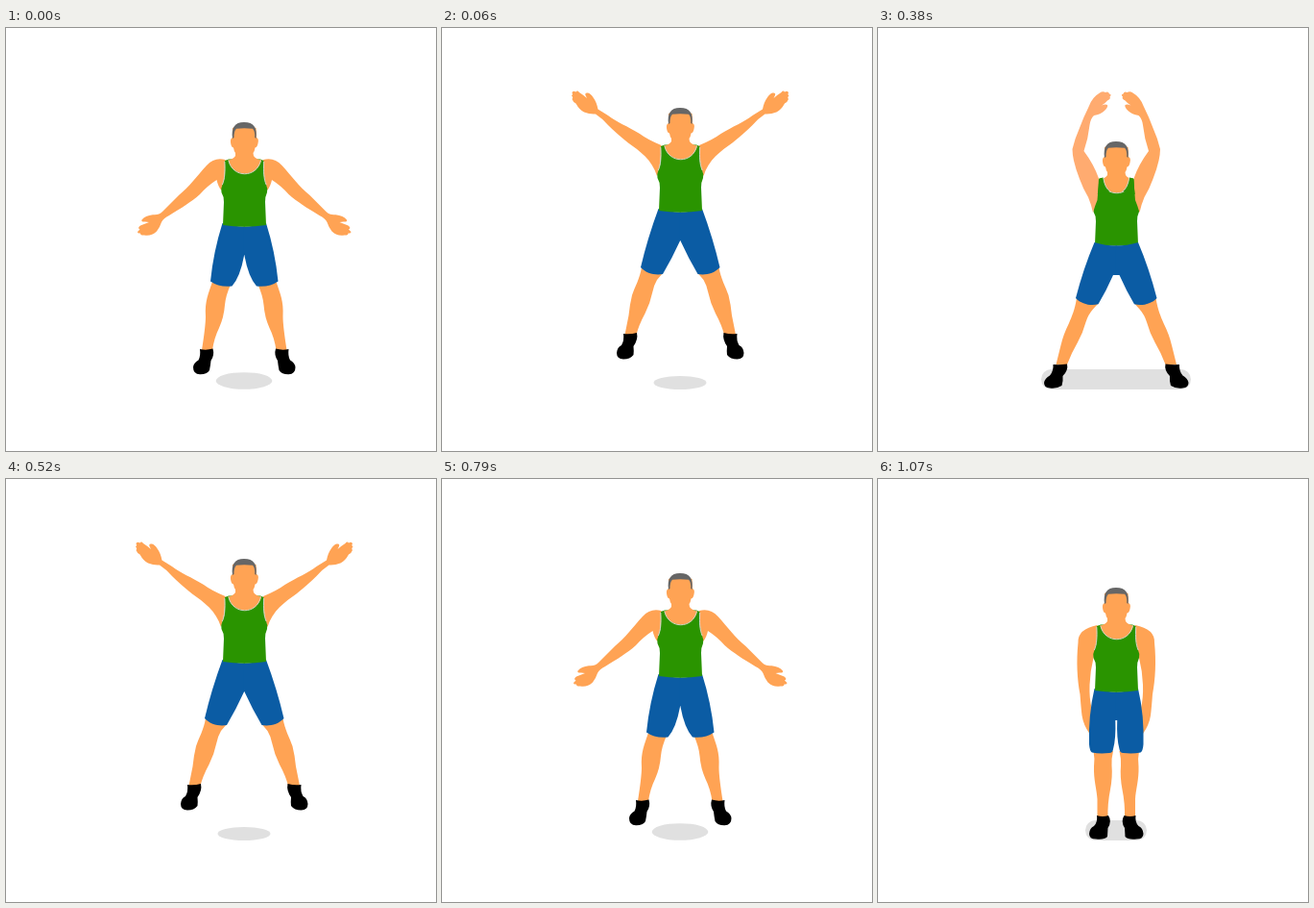
Animation of 448x440 px, one loop 1200 ms. Source, as an HTML page:

```html
<!DOCTYPE html>
<html lang="en">
<head>
<meta charset="utf-8">
<title>Jumping jack</title>
<style>
  html, body { margin: 0; width: 100%; height: 100%; overflow: hidden; background: #fff; }
  svg { display: block; width: 448px; height: 440px; }
  .skin { fill: #ffa354; }
  .arm { fill: var(--arm, #ffa354); }
  .shirt { fill: #2a9400; }
  .shorts { fill: #0b5ca4; }
  .hair { fill: #666; }
  .shadow { fill: #e0e0e0; }
  .seam { fill: none; stroke: #d2d4c4; stroke-width: 1; }
  .far { --arm: #ffab70; }
  .near { --arm: #ffa760; }
  .pose { visibility: hidden; animation: 1.2s step-end infinite; }
  #open { animation-name: open; }
  #leap { animation-name: leap; }
  #land { animation-name: land; }
  #rest { animation-name: rest; }
  @keyframes open {
    0% { visibility: visible; }
    5% { visibility: hidden; }
    55% { visibility: visible; }
    73.3333%, 100% { visibility: hidden; }
  }
  @keyframes leap {
    0% { visibility: hidden; }
    5% { visibility: visible; }
    13.3333% { visibility: hidden; }
    43.3333% { visibility: visible; }
    55%, 100% { visibility: hidden; }
  }
  @keyframes land {
    0% { visibility: hidden; }
    13.3333% { visibility: visible; }
    43.3333%, 100% { visibility: hidden; }
  }
  @keyframes rest {
    0% { visibility: hidden; }
    73.3333%, 100% { visibility: visible; }
  }
</style>
</head>
<body>
<svg viewBox="0 0 448 440">
  <defs>
    <g id="torso">
      <path class="shirt" d="M228 138 L232 136.5 L265 136.5 L268.5 138 C268 150 269 157 271 163 Q273 167 272 171 Q270 175 270 181 L271 205 Q248.3 208.5 226 205 L227 181 Q227 175 224.5 171 Q223.5 167 225.5 163 C228 157 228.5 150 228 138 Z"/>
      <path class="skin" d="M236 104 Q248 98 260.5 104 L261 114 Q263.5 115 262.7 119 Q262 124 259.5 124.5 Q259 128 257.5 130 L258 133 Q260 136 266 137.5 C262 156 236 156 231.5 137.5 Q237 136 239 133 L239 130 Q237.5 128 237 124.5 Q234.5 124 234 119 Q233.5 115 236 114 Z"/>
      <path class="seam" d="M231.8 137.5 C236 156.5 261.5 156.5 265.5 137.5 M227.8 139 C228.3 150 228 157 225.3 163 M268.7 139 C268.2 150 268.5 157 271.2 163"/>
      <path class="hair" d="M236 115 C234.5 104 238 98 248 98 C258.5 98 262 104 260.5 115 L259.2 114 Q259.5 107 257 104.8 Q248 103.8 240 104.8 Q237.5 107 237.5 114 Z"/>
    </g>

    <g id="openHalf">
      <path class="skin" d="M228.5 137 Q217 134 209 143 C199 154 191 165 180 174 L163 191 Q159 195 153 194.2 Q145 195 141.5 199.5 Q140.5 202 145 201.5 L149 202 L140 205.5 Q136.5 208 139.5 209.5 L137 212 Q137 214 140 213.5 Q140 216 144 215.5 Q151 217 157 211.5 Q160 208 162 202 Q164 198 170 195 C183 187 193 181 202 173 Q210 164 219.5 158 Q221 165 224.5 169 Q228 158 228.5 137 Z"/>
      <path class="skin" d="M215 264 C211 276 207 284 208 300 Q208 310 204 335 L215 335 Q217 322 222 312 Q227 301 228 288 Q229 278 234 267 Z"/>
      <path class="shorts" d="M225.5 203 Q237 206.5 249 206.5 L249 236 L248.2 236 Q244 259 235.5 268.5 Q222 270 213 263.5 Q216 233 225.5 203 Z"/>
      <path d="M202 334 Q209 335.5 215.5 333.5 Q217.5 340 213.5 346 Q213 351 212 356 Q209 360.5 202 360.3 Q195 360 195 353 Q195.5 348 200.5 345.5 Q203 341 202 334 Z"/>
    </g>

    <g id="leapHalf">
      <path class="skin" d="M228.5 122 Q214 116 206 110 C193 102 182 98 173 91 L162.5 84.5 Q161 77 158 73 Q155 68 152 67.5 Q148.5 67 149.5 70 L151 73 Q147 69.5 143 67 Q141 64.5 139.5 66.5 Q136 64.5 135.5 67.5 Q137 69 135 70.5 Q137 72 135.5 74 Q136.5 77 139.5 78.5 Q143 85 148 87.5 Q154 90 160 89.5 Q167 94 173 101 Q181 109 194 119.5 C206 128 219 137 224 154 Q228 143 228.5 122 Z"/>
      <path class="skin" d="M208 249 C206 261 201 269 198 278 Q195.5 288 194.5 299 L190.5 319 L202.5 319 Q205 309 211.5 297 Q217 286 219.5 274 Q221 267 224 262 L230 255 Z"/>
      <path class="shorts" d="M225.5 188 Q237 191.5 249 191.5 L249 221 L248.2 221 Q240 239 230 256 C222 257.3 213 255.5 207 249 Q214 219 225.5 188 Z"/>
      <path d="M189 318 Q196 319 203 317 Q204.5 324 199.5 331 Q200 336 199.5 340 Q196 344.5 189 344.5 Q182 344 182 338 Q182.5 332 187 330 Q190 325 189 318 Z"/>
    </g>

    <g id="landHalf">
      <path class="arm" d="M230 156.5 Q225 142 214.5 128 Q219 115 220.5 101 Q221.5 94 225 91 Q232 90 236 86 Q240 82 239 80 Q237 79 233 80.5 Q237 78 239 75.500 Q243 73.5 241.5 71.5 Q244 69 241 68.5 Q240 65.5 237 67 Q234 65.5 231 67.5 Q223 72 219.5 82 Q214 93 210 104 Q205 115 202.5 126 Q202.500 131 204 138 Q206 147 210 157 Q214 168 219 176 Q222 183 224 192 Q226 185 228.5 179 Q229.5 168 230 156.5 Z"/>
      <path class="shirt" d="M230.3 156.5 L234.6 155.5 Q236 165 241.5 170 L228.8 173 Q230 165 230.3 156.5 Z"/>
      <path class="seam" d="M234.8 156 Q236.500 167 242.500 170.500"/>
      <path class="skin" d="M207 281 C205 293 202 300 199 307 Q193 319 190.5 330 L185.500 350 L197 350 Q201.5 338 208 327 Q213.500 317 216.5 306 Q219 298 224 292.500 L229 287 Z"/>
      <path class="shorts" d="M225.5 223 Q237 226.5 249 226.5 L249 257 L245 257 Q238 273 229.5 287.3 C222 289.3 212 287.500 206 281 Q214 250 225.5 223 Z"/>
      <path d="M182.5 350 Q190 350.5 197 349.5 Q198.5 356 192.5 362 Q193 367 191.5 372 Q186 375.5 179 374.5 Q173 374 173 369 Q174 364 179 361.5 Q183 357 182.5 350 Z"/>
    </g>

    <g id="restHalf">
      <path class="skin" d="M228.5 152 Q208 156 208.5 170 C206.5 190 207.5 208 210.5 224 Q211.5 238 212.5 246 Q214 256 220.5 265 L223 262 L222.5 238 Q220 228 220.5 214 Q221 200 224.5 186 Q228.5 174 228.5 152 Z"/>
      <path class="skin" d="M224.5 283 Q226 290 225 299 C224.5 313 228 323 228.5 333 L228.5 352 L239.5 352 Q239 338 242 323 Q244.5 310 243.5 298 Q243 291 245 283 Z"/>
      <path class="shorts" d="M225.5 218 Q237 221.5 249 221.5 L249 251 L247.3 251 Q248 270 245 281 Q244.5 285 241 285 Q231 286 223 284.5 Q220.5 283 220 276 Q219 246 225.5 218 Z"/>
      <path d="M228 350 Q234 352 240 350 Q244 356 239.5 363 L239 372 Q236 375.5 227 374.5 Q220 374.5 220 369 Q220.5 363 225 361 Q229 357 228 350 Z"/>
    </g>
  </defs>

  <g id="open" class="pose">
    <ellipse class="shadow" cx="248" cy="367" rx="29.3" ry="8.8"/>
    <use href="#openHalf"/>
    <use href="#openHalf" transform="matrix(-1 0 0 1 496.5 0)"/>
    <use href="#torso"/>
  </g>
  <g id="leap" class="pose">
    <ellipse class="shadow" cx="248" cy="369" rx="27.5" ry="7"/>
    <use href="#leapHalf"/>
    <use href="#leapHalf" transform="matrix(-1 0 0 1 496.5 0)"/>
    <use href="#torso" y="-15"/>
  </g>
  <g id="land" class="pose">
    <rect class="shadow" x="170" y="355" width="156" height="21" rx="10.5"/>
    <use href="#torso" y="20"/>
    <use href="#landHalf" class="far"/>
    <use href="#landHalf" class="near" transform="matrix(-1 0 0 1 496.5 0)"/>
  </g>
  <g id="rest" class="pose">
    <rect class="shadow" x="216" y="355" width="64" height="21" rx="10.5"/>
    <use href="#restHalf"/>
    <use href="#restHalf" transform="matrix(-1 0 0 1 496.5 0)"/>
    <use href="#torso" y="15"/>
  </g>
</svg>
</body>
</html>
```
